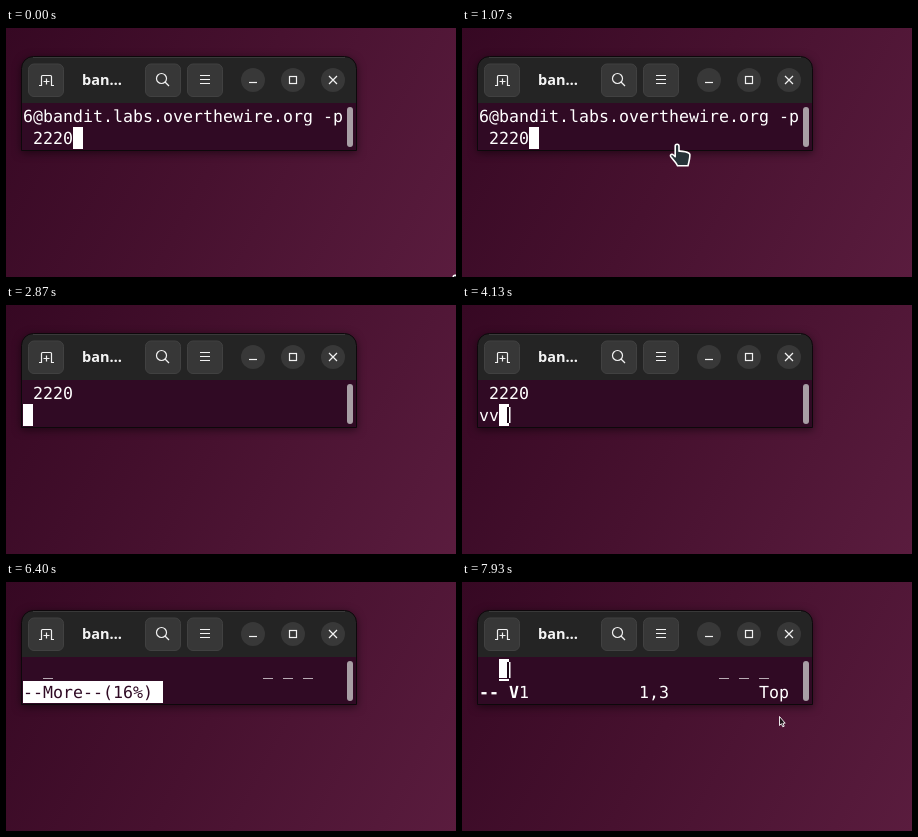
An HTML page for the animation above (8 s loop, 450x249 px).

```html
<!DOCTYPE html>
<html lang="en">
<head>
<meta charset="utf-8">
<title>Terminal</title>
<style>
  html, body { margin: 0; width: 100%; height: 100%; overflow: hidden; }
  body { background: linear-gradient(118deg, #360823 0%, #47112f 48%, #5a1c3e 100%); }
  svg { display: block; width: 450px; height: 249px; }
  .win { filter: drop-shadow(0 2px 4px rgba(0, 0, 0, .5)); }
  .btn { fill: #373737; stroke: #414141; }
  .round { fill: #383838; }
  .icon { fill: none; stroke: #f2f2f2; stroke-width: 1.2; }
  .title { font: bold 14.5px "Noto Sans", "Open Sans", sans-serif; fill: #f4f4f4; }
  .term text {
    font: 16.61px "DejaVu Sans Mono", "Noto Sans Mono", monospace;
    white-space: pre; fill: #fff; text-rendering: geometricPrecision;
  }
  .term .bold { font-weight: bold; }
  .term .dark { fill: #300a24; }
</style>
</head>
<body>
<svg viewBox="0 0 450 249">
  <g class="win">
    <path d="M15.5 122.5V40.500a12 12 0 0 1 12-12H338.500a12 12 0 0 1 12 12V122.500Z" fill="#242424" stroke="#0d080b"/>
  </g>
  <path d="M27 29.500H339" stroke="#393939"/>
  <rect x="16" y="75" width="334" height="47" fill="#300a24"/>

  <rect class="btn" x="22.500" y="36" width="35" height="32.500" rx="5.500"/>
  <rect class="btn" x="139.500" y="36" width="35" height="32.500" rx="5.500"/>
  <rect class="btn" x="181.500" y="36" width="35" height="32.500" rx="5.500"/>
  <circle class="round" cx="247" cy="52" r="12"/>
  <circle class="round" cx="287" cy="52" r="12"/>
  <circle class="round" cx="327" cy="52" r="12"/>
  <g class="icon">
    <path d="M33 57.500H35.500V48.500a1 1 0 0 1 1-1H44.500a1 1 0 0 1 1 1V57.500H48M40.500 50.500V56.500M37.500 53.500H43.500"/>
    <circle cx="155.500" cy="50.500" r="5"/>
    <path d="M159 54L163 58"/>
    <path d="M194 47.500H204M194 51.500H204M194 55.500H204"/>
    <path d="M243 54.500H251"/>
    <rect x="283.500" y="48.500" width="7" height="7"/>
    <path d="M323 48L331 56M331 48L323 56"/>
  </g>
  <text class="title" x="76" y="57">ban…</text>

  <g class="term">
    <rect id="bar" x="17" y="99" width="130" height="22" fill="#fff"/>
    <text id="top" x="17" y="94"></text>
    <text id="low" x="17" y="116"></text>
    <text id="mode" x="17" y="116"><tspan class="bold">-- V</tspan>1</text>
    <g id="block">
      <rect width="10" height="22" fill="#fff"/>
      <g id="notch">
        <rect x="8" y="3" width="2" height="16" fill="#1c0615"/>
        <rect x="10" y="3" width="1.500" height="16" fill="#fff"/>
      </g>
      <rect id="under" y="19" width="10" height="1" fill="#300a24"/>
    </g>
  </g>
  <rect x="341" y="79" width="6" height="40" rx="3" fill="#a89fa5"/>

  <path id="hand" d="M6.200 3.200C6.200.6 10 .6 10 3.200V8.200C13 8 20 9 20.800 11.200C21.200 14 20.500 17 19 22.800H8.500C7.500 20 3.500 16 1.600 13.400C.8 11.600 3 10.600 4.400 12L6.200 13.600Z"
    fill="#263238" stroke="#fff" stroke-width="1.600" stroke-linejoin="round"/>
  <path id="arrow" d="M.5.5V9.500L2.400 7.700L3.800 10.800L5.200 10.200L3.900 7.200H6.200Z"
    fill="#1c1418" stroke="#fff" stroke-width=".9" stroke-linejoin="round"/>
</svg>
<script>
const LOOP = 8000;
const $ = id => document.getElementById(id);
const el = {};
for (const id of ['bar', 'top', 'low', 'mode', 'block', 'notch', 'under', 'hand', 'arrow']) el[id] = $(id);

const art = '  _' + ' '.repeat(21) + '_ _ _';
const ruler = ' '.repeat(16) + '1,3' + ' '.repeat(9) + 'Top';
const port = ' 2220';

// start, top row, bottom row, caret column (-1 hides it), caret row, notched caret
const screens = [
  [0, '6@bandit.labs.overthewire.org -p', port, 5, 1],
  [2870, port, '', 0, 1],
  [3470, port, '', -1, 1],
  [3870, port, '', 0, 1],
  [3930, port, 'v', 1, 1],
  [4130, port, 'vv', 2, 1, true],
  [4270, port, 'vvv', 3, 1],
  [4470, port, 'vvvv', 4, 1],
  [4670, port, 'vvvvv', 5, 1],
  [4870, port, 'vvvvvv', 6, 1, true],
  [5000, '', '', 0, 1],
  [5130, '', 'v', 1, 1],
  [5200, '', 'vv', 2, 1, true],
  [6400, art, '--More--(16%)', 13, 1],
  [6600, art, '"~/text.txt" [readonly] 6L, 276B', -1, 1],
  [6670, art, ruler, 2, 0, true],
  [7270, art, ruler, -1, 0],
  [7870, art, ruler, 2, 0, true]
];

// start, shape, x, y
const pointer = [
  [0, 'hand', 441, 246],
  [1130, 'hand', 203, 109],
  [1200, 'hand', 201, 106],
  [1470, 'hand', 201, 102],
  [1530, 'arrow', 200, 97],
  [2070, 'arrow', 79, 147],
  [2130, ''],
  [7670, 'arrow', 150, 126],
  [7730, 'arrow', 215, 129],
  [7800, 'arrow', 270, 132],
  [7870, 'arrow', 304, 133],
  [7930, 'arrow', 317, 134]
];

const at = (list, t) => list.filter(row => row[0] <= t).pop();
const show = (node, on) => node.setAttribute('visibility', on ? 'inherit' : 'hidden');
const move = (node, x, y) => node.setAttribute('transform', `translate(${x} ${y})`);

function drawScreen(t) {
  const [, top, low, col, row, notch] = at(screens, t);
  const more = low.startsWith('--More');
  el.top.textContent = top;
  el.top.setAttribute('y', top === art ? 93 : 94);
  el.low.textContent = low;
  el.low.setAttribute('class', more ? 'dark' : '');
  show(el.bar, more);
  show(el.mode, t >= 6870);
  show(el.block, col >= 0);
  show(el.notch, notch);
  show(el.under, row === 0);
  move(el.block, 17 + 10 * col, 77 + 22 * row);
}

function drawPointer(t) {
  let [, shape, x, y] = at(pointer, t);
  if (t >= 270 && t < 1130) {
    const step = Math.min(13, Math.floor((t - 270) / (800 / 12) + 0.01) + 1);
    const p = step / 13;
    const ease = p * p * (3 - 2 * p);
    x = 441 - 234 * ease;
    y = 246 - 131 * ease;
  }
  show(el.hand, shape === 'hand');
  show(el.arrow, shape === 'arrow');
  if (shape) move(el[shape], x, y);
}

function frame() {
  const t = performance.now() % LOOP;
  drawScreen(t);
  drawPointer(t);
  requestAnimationFrame(frame);
}
frame();
</script>
</body>
</html>
```
